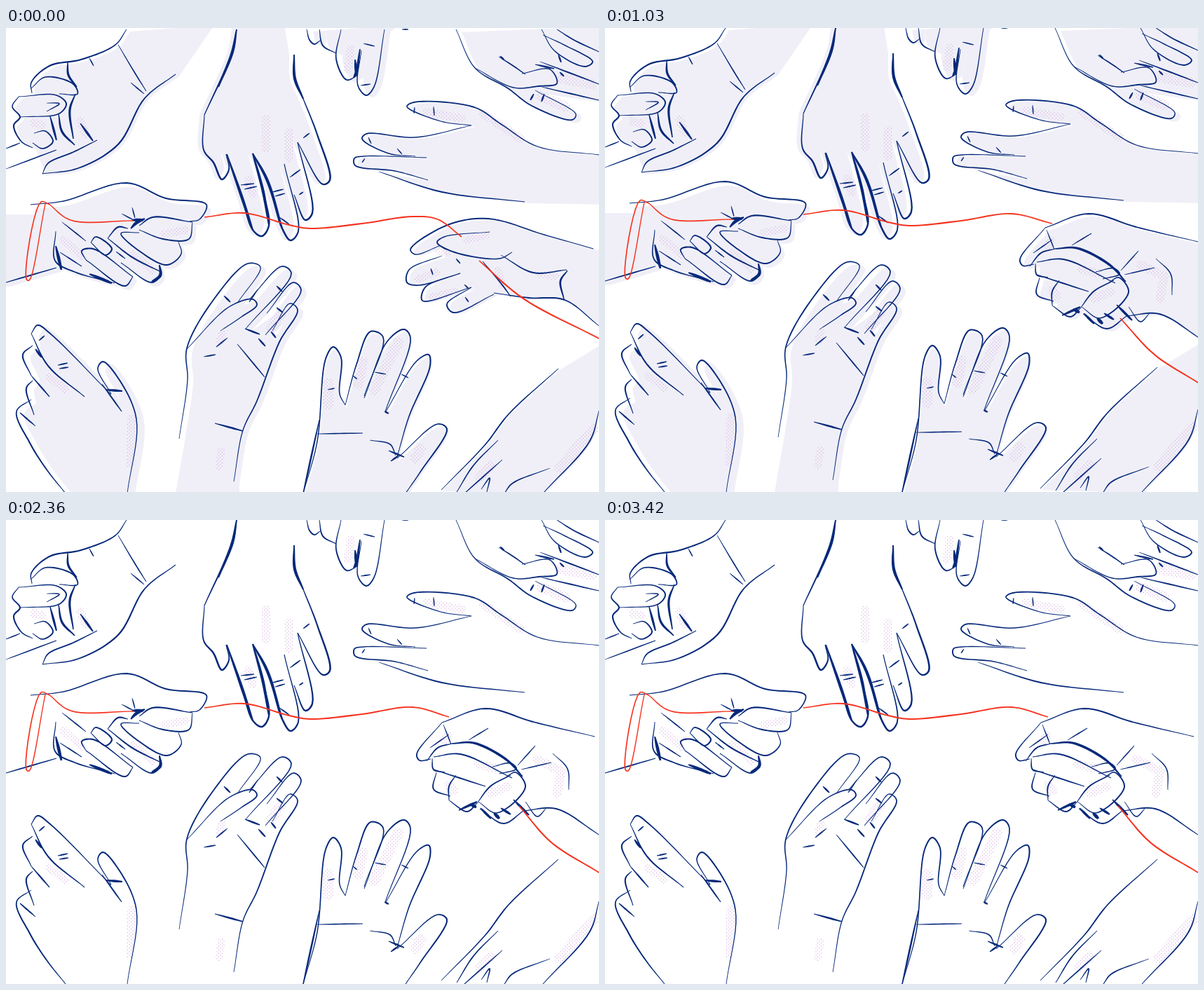
Animation of 846x662 px, one loop 4150 ms. Source, as an HTML page with a canvas:

```html
<!DOCTYPE html>
<html lang="en">
<head>
<meta charset="utf-8">
<title>Hands and thread</title>
<style>
html, body { margin: 0; width: 100%; height: 100%; overflow: hidden; background: #fff; }
canvas { display: block; }
</style>
</head>
<body>
<canvas id="stage" width="846" height="662"></canvas>
<script>
const ctx = document.getElementById("stage").getContext("2d");
const BLUE = "#06297a", RED = "#f5331f", LILAC = "#f0eff7";
let tinted = false;

const tile = document.createElement("canvas");
tile.width = tile.height = 5;
const tileCtx = tile.getContext("2d");
tileCtx.fillStyle = "#d3a9dd";
for (const [x, y] of [[1, 1], [3.5, 3.5]]) {
  tileCtx.beginPath();
  tileCtx.arc(x, y, 0.65, 0, 7);
  tileCtx.fill();
}
const halftone = ctx.createPattern(tile, "repeat");

const parse = text => text.split(" ").map(s => s.split(",").map(Number));
const mix = (a, b, t) => [a[0] + (b[0] - a[0]) * t, a[1] + (b[1] - a[1]) * t];

// Centripetal Catmull-Rom curve through the points of "x,y x,y ..."
function sample(text) {
  const p = parse(text), n = p.length, out = [];
  const all = [mix(p[0], p[1], -1), ...p, mix(p[n - 1], p[n - 2], -1)];
  for (let i = 0; i < n - 1; i++) {
    const [a, b, c, d] = all.slice(i, i + 4);
    const gap = (p, q) => Math.sqrt(Math.hypot(p[0] - q[0], p[1] - q[1]));
    const t1 = gap(a, b), t2 = t1 + gap(b, c), t3 = t2 + gap(c, d);
    for (let s = 0; s < 1; s += 0.1) {
      const u = t1 + s * (t2 - t1), mid = mix(b, c, s);
      const before = mix(mix(a, b, u / t1), mid, u / t2);
      const after = mix(mid, mix(c, d, (u - t2) / (t3 - t2)), (u - t1) / (t3 - t1));
      out.push(mix(before, after, s));
    }
  }
  return [...out, p[n - 1]];
}

function polygon(points, color) {
  ctx.fillStyle = color;
  ctx.beginPath();
  points.forEach(([x, y]) => ctx.lineTo(x, y));
  ctx.fill();
}

// A pen stroke, thinner towards both ends
function stroke(color, width, curve, taper) {
  const c = sample(curve), last = c.length - 1, left = [], right = [];
  c.forEach(([x, y], i) => {
    const [a, b] = [c[Math.max(0, i - 1)], c[Math.min(last, i + 1)]];
    const dx = b[0] - a[0], dy = b[1] - a[1];
    const r = width / 2 * (1 - taper + taper * Math.sin(Math.PI * i / last)) / (Math.hypot(dx, dy) || 1);
    left.push([x - dy * r, y + dx * r]);
    right.unshift([x + dy * r, y - dx * r]);
  });
  polygon(left.concat(right), color);
}

const ink = (width, ...curves) => curves.forEach(c => stroke(BLUE, width, c, 0.6));
const thread = (width, ...curves) => curves.forEach(c => stroke(RED, width, c, 0.25));

// Outline strokes in order; the shape they enclose gets an offset tint below
function outline(width, dx, dy, corners, ...curves) {
  ink(width, ...curves);
  if (!tinted) return;
  ctx.save();
  ctx.globalCompositeOperation = "destination-over";
  ctx.translate(dx, dy);
  polygon([...curves.flatMap(sample), ...parse(corners)], LILAC);
  ctx.restore();
}

function dots(width, ...lines) {
  ctx.strokeStyle = halftone;
  ctx.lineWidth = width;
  ctx.lineCap = "round";
  for (const line of lines) {
    ctx.beginPath();
    parse(line).forEach(([x, y]) => ctx.lineTo(x, y));
    ctx.stroke();
  }
}

function topLeftFist() {
  outline(2.2, 5, 3, "292,-9", "172,0 156,22 107,43 62,52 36,76 37,91",
    "18,96 9,110 20,125 11,137 22,160 38,169", "52,206 103,198 160,164 198,98 242,64");
  ink(2, "36,84 56,68 96,78 102,92 76,92", "18,96 72,94 86,106 76,120 20,125", "40,148 56,145 67,160 52,170 38,162", "52,206 60,191 96,175 130,158");
  ink(1.7, "0,170 20,162", "0,199 72,172", "160,22 185,64 200,88", "178,76 197,92", "119,41 125,52", "58,105 76,106 58,117");
  ink(3.2, "75,121 80,146 98,165", "88,47 89,65 101,82", "99,92 91,115 96,156", "106,134 124,159", "63,124 72,158");
}

function topCentreHand() {
  outline(2.6, -7, 0, "404,-9 332,-9", "329,0 323,32 283,122", "283,122 282,172 296,190 308,214 318,200 314,178",
    "315,178 336,238 352,286 365,295 375,280 367,232 352,177", "352,177 373,216 394,284 406,301 417,288 397,192",
    "411,236 427,272 437,262 416,161", "416,161 452,221 462,215 444,150 422,94", "424,99 412,70 411,36");
  ink(4.2, "329,0 323,32 303,82", "315,178 336,238 352,286", "375,280 367,232 352,177", "352,177 373,216 394,284", "411,36 412,70 424,99");
  ink(2, "335,222 354,220", "340,228 358,224", "380,232 396,228", "384,238 398,234", "405,211 420,200", "418,236 424,232", "424,155 433,148", "390,268 404,278");
}

function topRightHands() {
  outline(2, 9, 3, "552,-9", "429,0 433,15 440,21 448,16", "447,0 452,23 471,34", "478,0 471,42 486,72 501,66",
    "507,30 502,80 514,94 525,82 540,0");
  ink(4, "505,28 500,60 496,69", "498,43 500,66");
  ink(1.8, "510,20 526,24", "506,80 520,78", "565,0 574,0");
  outline(1.9, 8, 4, "846,101 860,-9", "642,0 669,55 716,84 750,109 808,129 813,121 755,87");
  ink(1.9, "669,55 724,83 760,81 786,77 776,57 736,63", "703,39 722,51 741,64", "764,0 782,30 826,53 837,46 798,23 766,8", "762,46 846,78", "764,82 846,101", "786,0 810,15 846,32");
  ink(2.6, "755,50 782,56", "788,36 792,47", "768,92 764,103", "790,61 796,67", "753,92 748,101", "705,38 711,44");
}

function reachingHand() {
  outline(1.9, 6, 2, "860,248", "846,179 758,167 706,135 668,111 582,104 572,110 620,131 664,137",
    "664,137 584,154 514,149 508,156 546,177 584,181", "600,183 510,181 497,184 498,194 555,202 602,215", "532,203 622,232 740,246");
  ink(1.7, "583,111 582,120", "610,110 611,123", "517,154 521,163", "512,184 508,190", "558,170 565,178");
}

function holdingFist() {
  outline(2, 6, 6, "-15,361 -15,258 35,258", "35,250 82,245 172,219 228,241 286,250 276,271 262,274",
    "266,275 261,299 224,299 190,286", "246,303 250,320 230,336 190,316 164,291 190,290",
    "219,336 220,351 208,361 164,333", "181,353 170,366 114,329", "155,362 98,346 70,330 71,288", "72,340 0,361");
  ink(2.2, "190,280 209,268 266,275", "145,298 160,282 174,284", "145,298 180,325 221,346", "114,329 108,316 124,313 181,353", "121,304 128,296 151,313 142,322 121,304");
  ink(4.5, "178,284 186,276 198,270", "180,272 196,272", "71,309 79,343", "219,336 220,351 208,360", "119,349 151,362");
  ink(1.7, "180,254 184,269", "80,275 99,290 114,302", "77,318 108,338", "157,317 170,327", "165,263 182,272");
}

function lowerLeftHands() {
  outline(2.1, 11, 3, "90,680 175,680", "150,521 62,433 45,422 36,434", "38,451 24,464 36,494", "38,501 29,512 40,550",
    "36,528 15,545 34,590 58,628 85,662", "173,662 186,556 159,496 138,474 131,484 150,520");
  ink(2.1, "36,434 60,480 112,524", "36,494 62,524", "42,566 20,547", "137,506 165,545", "74,479 88,476", "76,484 89,482", "47,444 55,437");
  ink(3.4, "42,456 51,468", "142,514 166,516");

  outline(1.9, 8, 4, "325,680 230,680", "247,584 259,500 258,455 298,383 345,334 363,339 331,389", "348,384 394,338 407,348 342,427",
    "372,405 410,361 421,372 370,436", "380,430 405,391 416,400 390,446 358,530 338,572 325,645");
  ink(1.9, "258,456 318,396 352,385 358,393 336,410 306,430", "330,449 369,496", "282,467 299,464", "316,440 300,453", "359,371 347,389");
  ink(2.6, "298,562 338,573", "341,427 362,435", "360,441 370,452", "386,397 395,404", "386,366 394,374", "311,380 320,389", "378,431 385,440");
}

function lowerRightHands() {
  outline(2.1, 2, 4, "570,680 424,680", "424,662 444,588 456,470 467,453 478,468 476,520 484,536", "484,536 500,478 520,431 538,439 511,523",
    "511,526 544,445 568,428 577,440 541,545", "542,545 586,473 603,464 605,480 575,552 558,610", "558,612 616,563 629,570 592,630 570,662");
  ink(2.6, "447,557 424,662", "546,601 568,610", "549,616 560,608", "540,545 546,548");
  ink(1.7, "443,577 509,576", "519,586 548,592 556,608", "459,514 469,512", "495,494 501,499", "526,489 542,492", "564,492 574,497");

  outline(1.9, 2, 2, "860,440 860,540", "846,544 833,587 766,662", "621,657 684,592 717,549 788,484");
  ink(1.8, "702,586 667,622 643,660", "708,614 654,662", "678,656 690,640 686,660", "776,626 722,648 711,662");
}

function halftones() {
  dots(12, "106,130 114,150", "40,134 52,136", "371,128 371,170", "404,146 404,184", "346,214 352,234", "492,28 488,56", "680,120 734,156", "600,118 650,127");
  dots(11, "82,300 108,324", "226,292 256,286", "182,320 208,344", "62,496 84,514", "179,555 177,620", "308,434 304,446", "307,602 304,624");
  dots(15, "392,408 378,426", "460,505 460,535", "509,474 502,506", "560,446 525,515", "592,598 584,612", "838,570 790,625", "692,623 676,638", "792,70 836,78", "764,96 798,110");
}

function openHand() {
  dots(11, "616,318 630,320", "588,358 614,348", "608,384 640,376", "702,345 708,366", "762,352 784,354", "658,302 684,296");
  outline(2, 5, 2, "860,412 860,308", "838,315 768,295 688,272 630,281 577,316 584,323 618,311", "622,325 575,345 572,363 588,367 648,350",
    "648,350 598,370 594,389 664,370", "664,370 629,394 638,406 696,380", "696,378 746,385 797,388 846,425");
  ink(2, "690,291 625,298 615,306 640,320 704,329 722,320", "680,333 706,364 720,383", "706,324 752,349 800,345", "606,343 609,352", "642,329 648,336", "654,366 660,372", "655,384 660,391");
  ink(2.8, "801,346 791,361 796,387");
}

function halfOpenHand() {
  dots(12, "640,298 674,293", "588,350 630,338", "588,392 642,372", "630,406 644,398", "758,392 788,382");
  outline(2, 5, 2, "860,310", "846,319 760,284 704,271 630,278 608,280 614,295 656,307", "655,308 578,339 573,361 654,336",
    "610,363 566,382 577,403 662,352", "626,386 612,405 638,412 664,382", "674,399 690,372 707,383 682,416 674,399", "722,407 790,392 846,419");
  ink(3.2, "672,310 703,355 724,404", "701,396 722,405", "656,369 660,372");
  ink(1.7, "656,307 686,303", "690,317 712,330", "684,321 710,352", "798,360 799,383 784,391", "594,338 599,350", "627,326 632,338", "588,377 593,388", "784,336 774,346");
}

function fist() {
  dots(13, "630,308 626,316", "674,348 696,354", "692,390 716,380", "758,342 792,358 786,390", "632,378 638,386");
  outline(2, 6, 4, "860,438 860,306", "840,309 752,288 684,269 622,289", "622,289 586,334 590,343 606,341", "608,340 610,356 626,360",
    "614,360 610,384 634,394", "632,400 658,416 672,404", "676,412 710,433 738,415", "738,415 785,412 846,449");
  ink(2, "600,344 616,325 636,319", "610,338 648,334 722,368", "610,356 684,380", "642,364 632,380 632,400", "672,404 691,380 720,364", "674,402 700,418 741,381 727,360 713,367", "694,352 720,347 728,355 704,362");
  ink(3.6, "636,319 667,318 714,342 737,366", "646,414 672,402", "677,411 692,426", "706,411 720,420", "724,399 746,421");
  ink(5, "662,405 671,410", "696,418 704,426");
  ink(1.6, "624,292 635,320", "632,306 605,325", "660,314 688,297", "730,350 755,322", "735,356 778,346", "780,333 801,355 803,385", "741,402 758,423 770,412");
}

const poses = {
  open: { tinted: true, shift: 2, hand: openHand, end: "616,271 650,296", far: "675,332 738,386 846,443" },
  halfOpen: { hand: halfOpenHand, end: "632,279", far: "655,310 676,336 756,398 846,442" },
  fist: { hand: fist, end: "632,281", far: "732,408 778,460 846,503" },
  pulled: { tinted: true, slip: [6, -4], hand: fist, end: "638,281", far: "735,414 784,466 846,506" }
};

function draw(pose) {
  const [dx, dy] = pose.slip || [0, 0];
  tinted = pose.tinted;
  ctx.clearRect(0, 0, 846, 662);
  ctx.save();
  ctx.translate(0, pose.shift || 0);
  halftones();
  topLeftFist();
  topCentreHand();
  topRightHands();
  reachingHand();
  holdingFist();
  lowerLeftHands();
  lowerRightHands();
  thread(1.7, "62,250 50,246 29,356 33,358 56,249", "60,248 92,272 182,273");
  ctx.restore();

  ctx.save();
  ctx.translate(dx, dy);
  pose.hand();
  ctx.restore();

  ctx.save();
  ctx.translate(0, pose.shift || dy / 2);
  thread(2.1, "283,268 340,262 404,279 434,284 508,277 580,267 " + pose.end);
  ctx.restore();
  thread(2.2, pose.far);
}

const timeline = [[0, "open"], [300, "halfOpen"], [1030, "pulled"], [1330, "fist"],
  [2060, "pulled"], [2360, "fist"], [3090, "pulled"], [3420, "fist"]];
let shown;

function tick() {
  const time = performance.now() % 4150;
  const name = timeline.filter(([start]) => start <= time).pop()[1];
  if (name !== shown) draw(poses[shown = name]);
  requestAnimationFrame(tick);
}
tick();
</script>
</body>
</html>
```
